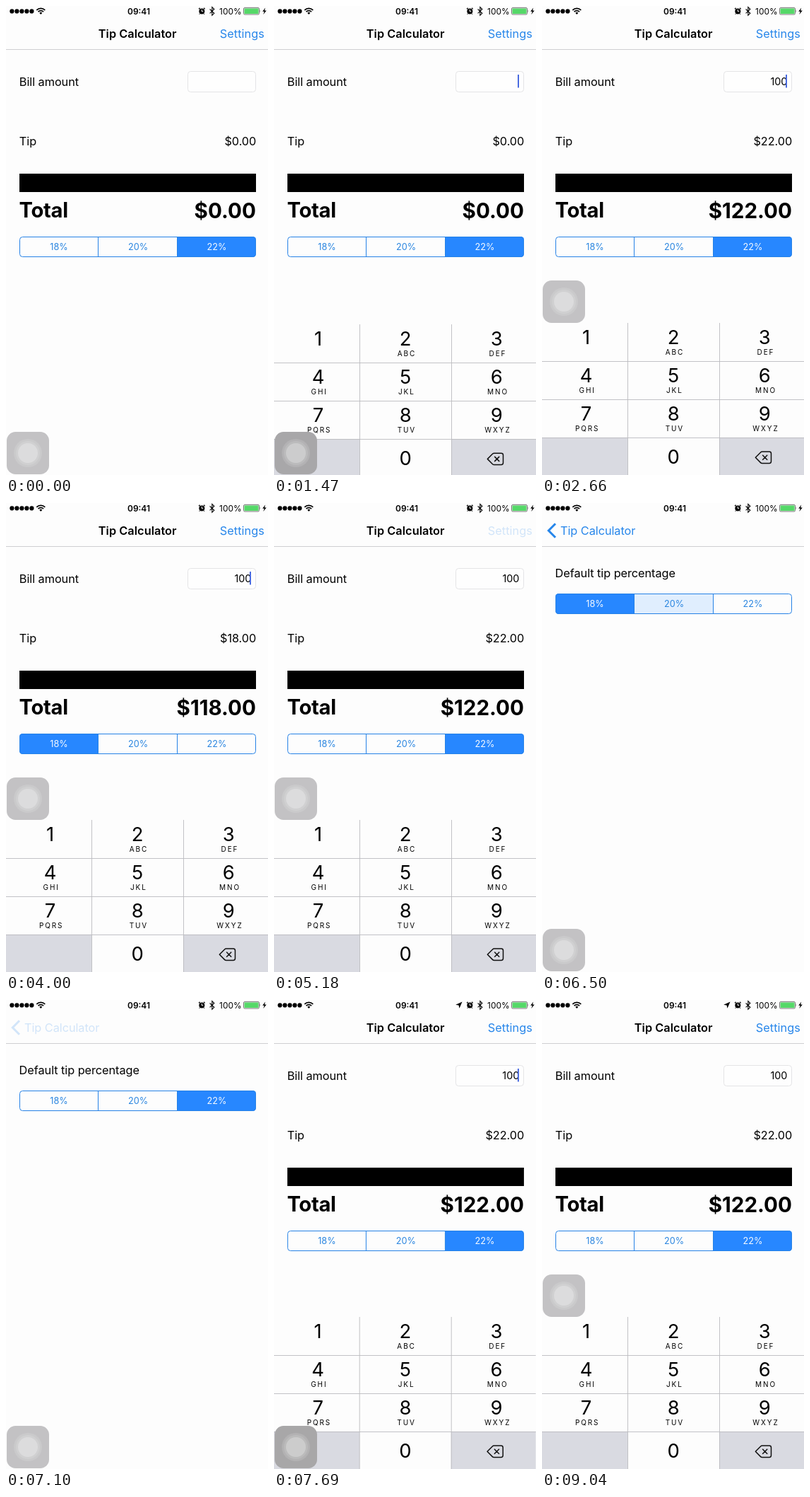
An HTML page for the animation above (9.9 s loop, 371 by 663 pixels).

```html
<!DOCTYPE html>
<html lang="en">
<head>
<meta charset="utf-8">
<title>Tip Calculator</title>
<style>
  html, body { margin: 0; width: 100%; height: 100%; overflow: hidden; background: #fdfdfd; }
  svg { display: block; width: 371px; height: 663px; font-family: Inter, "Open Sans", sans-serif; font-size: 16.3px; letter-spacing: -.05px; }
  .end { text-anchor: end; }
  .mid { text-anchor: middle; }
  .blue { fill: #2786ea; }
  .big { font-size: 29.6px; font-weight: 700; letter-spacing: 0; }
  .seg text { font-size: 12.7px; letter-spacing: 0; text-anchor: middle; }
  .num { font-size: 27.4px; letter-spacing: 0; text-anchor: middle; }
  .abc { font-size: 10px; letter-spacing: 1.9px; text-anchor: middle; }
  .status text { font-size: 11.9px; letter-spacing: 0; }
</style>
</head>
<body>
<svg id="stage" viewBox="0 0 371 663" xmlns="http://www.w3.org/2000/svg">
  <rect width="371" height="663" fill="#fdfdfd"/>

  <g id="main">
    <text x="18.8" y="112.5">Bill amount</text>
    <rect x="257.5" y="92.5" width="96" height="29" rx="4" fill="#fefefe" stroke="#e4e4e6"/>
    <text id="bill" class="end" x="347.3" y="112.1" style="font-size:14.4px"></text>
    <rect id="caret" x="345" y="97" width="2" height="18.5" fill="#4a6be0"/>
    <text x="18.8" y="196.5">Tip</text>
    <text id="tip" class="end" x="354.3" y="196.5"></text>
    <rect x="19" y="237" width="335" height="26"/>
    <text class="big" x="18.5" y="298.5" style="font-size:29.2px;letter-spacing:-.3px">Total</text>
    <text id="total" class="big end" x="354" y="299.5"></text>
    <g id="rates" class="seg" transform="translate(19 326)"></g>
    <rect id="dim" y="62" width="371" height="601" opacity="0"/>
  </g>

  <g id="prefs">
    <rect width="371" height="663" fill="#fdfdfd"/>
    <text x="18.6" y="104.5">Default tip percentage</text>
    <g id="defaults" class="seg" transform="translate(19 128)"></g>
  </g>

  <rect width="371" height="61" fill="#fdfdfd"/>
  <rect y="61" width="371" height="1" fill="#cfcfd1"/>
  <text id="title" y="45" font-weight="600" style="letter-spacing:.06px">Tip Calculator</text>
  <text id="back" class="blue" y="45">Tip Calculator</text>
  <path id="chevron" d="M19 29.2 9.3 39l9.7 9.8" fill="none" stroke="#2786ea" stroke-width="3"/>
  <text id="settings" class="blue end" x="366" y="45" style="letter-spacing:.06px">Settings</text>

  <g id="status" class="status">
    <path d="M43.3 5.9a8.6 8.6 0 0 1 12 0M45.5 8.2a5.4 5.4 0 0 1 7.6 0" fill="none" stroke="#000" stroke-width="1.7"/>
    <path d="M49.3 11.9l-2-2.1a2.9 2.9 0 0 1 4 0z"/>
    <text class="mid" x="188" y="11.5" font-weight="600">09:41</text>
    <path id="arrow" d="M266.5 2.6l-4 9.2-1-4.2-4.3-.9z"/>
    <circle cx="277.3" cy="7.6" r="4"/>
    <path d="M273 4.2l1.6-1.5M281.6 4.2l-1.6-1.5" stroke="#000" stroke-width="1.2"/>
    <path d="M274.6 10.8l-.9 1.1M280 10.8l.9 1.1" stroke="#000"/>
    <path d="M277.3 5v2.8h2" fill="none" stroke="#fdfdfd"/>
    <path d="M288.6 4.5l6.2 5.8-3 2.9v-11.6l3 2.9-6.2 5.8" fill="none" stroke="#000" stroke-width="1.1"/>
    <text class="end" x="333.6" y="11.5">100%</text>
    <rect x="336.5" y="2.5" width="22" height="9.5" rx="1.5" fill="#fdfdfd" stroke="#777"/>
    <rect x="337.5" y="3.5" width="20" height="7.5" fill="#55d868"/>
    <path d="M359.6 5.3q1.6 2 0 4z" fill="#555"/>
    <path d="M367.2 2.5l-4 5.3h2.5l-1.4 4.2 4.5-5.5h-2.6z"/>
  </g>

  <g id="pad"></g>

  <g id="assist">
    <rect x="1" width="60" height="60" rx="12.5" fill="#c3c2c4"/>
    <rect id="shade" x="1" width="60" height="60" rx="12.5"/>
    <g fill="#fff">
      <circle cx="31" cy="30" r="20" opacity=".12"/>
      <circle cx="31" cy="30" r="17" opacity=".11"/>
      <circle cx="31" cy="30" r="14" opacity=".26"/>
    </g>
  </g>
</svg>
<script>
const LOOP = 9900, STEP = 148.1, W = 371;
const RATES = [18, 20, 22];
const NS = "http://www.w3.org/2000/svg";
const $ = id => document.getElementById(id);

function add(parent, tag, attrs, text) {
  const el = document.createElementNS(NS, tag);
  for (const k in attrs) el.setAttribute(k, attrs[k]);
  if (text) el.textContent = text;
  return parent.appendChild(el);
}
const move = (id, x, y) => $(id).setAttribute("transform", `translate(${x.toFixed(2)} ${y.toFixed(2)})`);
const fade = (id, a) => $(id).setAttribute("opacity", a);
const show = (id, on) => $(id).setAttribute("display", on ? "inline" : "none");
const clamp = v => Math.min(1, Math.max(0, v));
const ease = v => { v = clamp(v); return v * v * (3 - 2 * v); };

// Critically damped spring from 0 to 1
function spring(ms) {
  const x = Math.max(0, ms) / 45;
  return 1 - (1 + x) * Math.exp(-x);
}
// Value of the latest [time, value] entry reached
function at(t, list) {
  let value = list[0][1];
  for (const [ms, v] of list) if (t >= ms) value = v;
  return value;
}

// Signal dots
for (let i = 0; i < 5; i++) add($("status"), "circle", { cx: 8.4 + 7 * i, cy: 7.4, r: 3.1 });

function segments(id) {
  const g = $(id), clip = id + "Clip";
  add(add(g, "clipPath", { id: clip }), "rect", { width: 335, height: 29, rx: 4.5 });
  const body = add(g, "g", { "clip-path": `url(#${clip})` });
  const edges = [0, 111.5, 223.5, 335];
  const cells = RATES.map((_, i) => add(body, "rect", { x: edges[i], width: edges[i + 1] - edges[i], height: 29 }));
  add(g, "rect", { x: .5, y: .5, width: 334, height: 28, rx: 4, fill: "none", stroke: "#2682e6" });
  add(g, "path", { d: "M111.5 0v29M223.5 0v29", stroke: "#2682e6" });
  const labels = RATES.map((r, i) => add(g, "text", { x: [56, 168, 279.5][i], y: 19.3 }, r + "%"));
  return (chosen, pressed) => RATES.forEach((r, i) => {
    cells[i].setAttribute("fill", r === chosen ? "#2787ff" : r === pressed ? "#e0eefe" : "#fdfdfd");
    labels[i].setAttribute("fill", r === chosen ? "#f4f9ff" : "#2b86e0");
  });
}
const setRates = segments("rates"), setDefaults = segments("defaults");

// Number pad, laid out from its own top edge
const pad = $("pad"), keys = {};
const COLS = [0, 121.5, 251, 371], MIDS = [62.5, 186.2, 315.3];
const LETTERS = ["", "ABC", "DEF", "GHI", "JKL", "MNO", "PQRS", "TUV", "WXYZ"];
const GREY = "#d9dae1", WHITE = "#fdfdfd";
for (let i = 0; i < 12; i++) {
  const c = i % 3, y = 54 * Math.floor(i / 3), last = i > 8;
  const name = last ? ["", "0", "del"][c] : String(i + 1);
  keys[name] = add(pad, "rect", {
    x: COLS[c], y, width: COLS[c + 1] - COLS[c], height: 55, fill: last && c !== 1 ? GREY : WHITE
  });
  if (!last || c === 1) add(pad, "text", { class: "num", x: MIDS[c], y: last ? 199 : y + 29.8 }, name);
  if (LETTERS[i]) add(pad, "text", { class: "abc", x: MIDS[c] + 1.7, y: y + 45.3 }, LETTERS[i]);
}
add(pad, "path", { d: "M0 54.5H371M0 108.5H371M0 162.5H371M121.5 0V216M251.5 0V216", stroke: "#bcbcc0", "stroke-width": .9 });
add(pad, "path", {
  d: "M302.3 190.3l7.3-7.3q.9-.9 2.2-.9h10q2.7 0 2.7 2.7v11q0 2.7-2.7 2.7h-10q-1.3 0-2.2-.9zM312.2 186.8l7 7M319.2 186.8l-7 7",
  fill: "none", stroke: "#111", "stroke-width": 1.5, "stroke-linejoin": "round"
});

const BILL = [[0, ""], [2000, "1"], [2300, "10"], [2600, "100"]];
const KEY = [[0, ""], [1850, "1"], [2000, ""], [2150, "0"], [2300, ""], [2450, "0"], [2600, ""]];
const RATE = [[0, 22], [3950, 18], [4250, 20], [4550, 22]];
const RATE_DOWN = [[0, 0], [3800, 18], [3950, 0], [4100, 20], [4250, 0], [4400, 22], [4550, 0]];
const DEFAULT = [[0, 22], [6300, 18], [6600, 20], [6900, 22]];
const DEFAULT_DOWN = [[0, 0], [6150, 18], [6300, 0], [6450, 20], [6600, 0], [6750, 22], [6900, 0]];
const SETTINGS_TINT = [[0, 1], [5110, .2], [5260, .6], [5400, .8], [7275, 1]];
// Caret turns on and off alternately, starting with on
const BLINK = [970, 3050, 3560, 4090, 4610, 4970, 7150, 7780, 8250, 8830];

function caret(t) {
  let a = 0;
  BLINK.forEach((ms, i) => {
    if (t >= ms) { const f = clamp((t - ms) / 200); a = i % 2 ? 1 - f : f; }
  });
  return t < 1170 ? 0 : a;
}

function draw(t) {
  const bill = at(t, BILL), rate = at(t, RATE);
  const tip = bill * rate / 100;
  $("bill").textContent = bill;
  $("tip").textContent = "$" + tip.toFixed(2);
  $("total").textContent = "$" + (+bill + tip).toFixed(2);
  fade("caret", caret(t));
  setRates(rate, at(t, RATE_DOWN));
  setDefaults(at(t, DEFAULT), at(t, DEFAULT_DOWN));

  // Page push and pop
  const p = t < 7275 ? spring(t - 5350) : 1 - spring(t - 7275);
  move("main", -.3 * W * p, 0);
  fade("dim", .1 * p);
  move("prefs", W * (1 - p), 0);
  show("prefs", p > .001);
  const x = 26 + 104.8 * (1 - p);
  $("title").setAttribute("x", x);
  $("back").setAttribute("x", x);
  const held = t > 7050 ? .2 : 1;
  fade("title", 1 - p);
  fade("back", p * held);
  fade("chevron", p * held);
  fade("settings", (1 - p) * at(t, SETTINGS_TINT));
  show("arrow", t > 7350);

  // Number pad rises once, then travels with the page
  const rise = spring(t - 1180);
  move("pad", -W * p, 448 + 215 * (1 - rise));
  show("pad", rise > 0 && p < .999);
  const down = at(t, KEY);
  for (const k of ["0", "1"]) keys[k].setAttribute("fill", k === down ? GREY : WHITE);

  // Floating button darkens while it covers the pad
  const lift = ease((t - 1500) / 270) - ease((t - 5795) / 270) + ease((t - 7720) / 270);
  move("assist", 0, 602 - 214 * lift);
  fade("shade", .14 * rise * (1 - p) * (1 - lift));
}

function frame(now) {
  const t = now % LOOP;
  draw(Math.floor((t + 18) / STEP) * STEP);
  requestAnimationFrame(frame);
}
draw(0);
requestAnimationFrame(frame);
</script>
</body>
</html>
```
